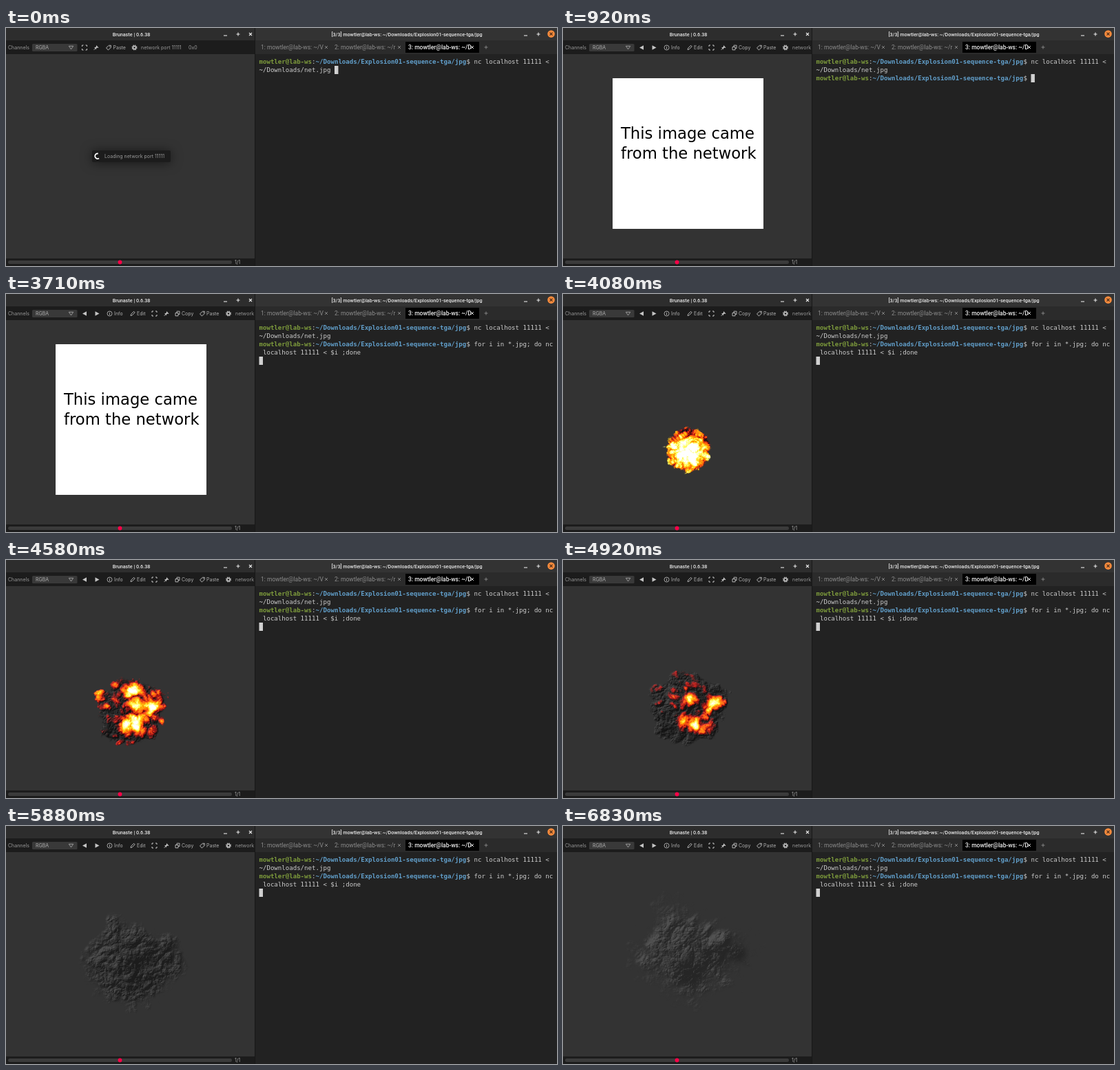
Write an HTML page with a canvas that moves like this. It is 800 by 346 pixels and loops after 6.88 s.

```html
<!DOCTYPE html>
<html lang="en">
<head>
<meta charset="utf-8">
<title>Network image viewer</title>
<style>
html, body { margin: 0; width: 100%; height: 100%; overflow: hidden; background: #222; }
canvas { display: block; }
</style>
</head>
<body>
<canvas id="stage" width="800" height="346"></canvas>
<script>
const LOOP = 6880, IMAGE_AT = 750, BLAST_AT = 3746, BLAST_STEP = 1000 / 24;
const APP = 'Brunaste', USER = 'mowtler@lab-ws', DIR = '~/Downloads/Explosion01-sequence-tga/jpg';
const UI = '7px Inter, sans-serif', TITLE = '500 7.2px Roboto, sans-serif';
const MONO = '9.09px "DejaVu Sans Mono", monospace';
const ctx = document.getElementById('stage').getContext('2d');
const clamp = v => v < 0 ? 0 : v > 1 ? 1 : v;
const mix = (a, b, k) => a + (b - a) * k;
const smooth = k => k * k * (3 - 2 * k);

// ---- drawing helpers ----
function rect(x, y, w, h, color, radius = 0) {
  ctx.fillStyle = color;
  ctx.beginPath();
  ctx.roundRect(x, y, w, h, radius);
  ctx.fill();
}
function text(s, x, y, font, color, align = 'left') {
  ctx.font = font;
  ctx.fillStyle = color;
  ctx.textAlign = align;
  ctx.fillText(s, x, y);
}
function stroke(d, x, y, color = '#c4c4c4', width = 1) {
  ctx.save();
  ctx.translate(x, y);
  ctx.strokeStyle = color;
  ctx.lineWidth = width;
  ctx.stroke(new Path2D(d));
  ctx.restore();
}
function fill(d, x, y, color = '#c4c4c4') {
  ctx.save();
  ctx.translate(x, y);
  ctx.fillStyle = color;
  ctx.fill(new Path2D(d));
  ctx.restore();
}
function disc(x, y, r, color) {
  ctx.fillStyle = color;
  ctx.beginPath();
  ctx.arc(x, y, r, 0, 7);
  ctx.fill();
}
const PLUS = 'M-2.5 0H2.5M0-2.5V2.5', CROSS = 'M-2-2L2 2M2-2L-2 2', MINUS = 'M-2.5 2H2.5';

// ---- toolbar icons ----
const icon = {
  expand: x => stroke('M-3.5-1.5V-3.5H-1.5M1.5-3.5H3.5V-1.5M3.5 1.5V3.5H1.5M-1.5 3.5H-3.5V1.5', x, 28.5),
  pin: x => {
    fill('M0-3.5L3.5 0L2.5 .6L1.2 0L-.2 1.6V3L-3-.2L-1.5-.2L0-1.5Z', x, 28.5);
    stroke('M-1.5 1.5L-3.5 3.5', x, 28.5, '#c4c4c4', .8);
  },
  tag: x => {
    stroke('M-3.5 .5L.5-3H3.3V.2L-.7 3.7Z', x, 28.3, '#c4c4c4', .9);
    disc(x + 1.6, 26.9, .6, '#c4c4c4');
  },
  gear: x => {
    ctx.setLineDash([1.4, 1.2]);
    stroke('M3.3 0A3.3 3.3 0 1 1-3.3 0A3.3 3.3 0 1 1 3.3 0', x, 28.5, '#c4c4c4', 1.4);
    ctx.setLineDash([]);
    stroke('M2.1 0A2.1 2.1 0 1 1-2.1 0A2.1 2.1 0 1 1 2.1 0', x, 28.5, '#c4c4c4', 1.5);
  },
  info: x => {
    stroke('M3.5 0A3.5 3.5 0 1 1-3.5 0A3.5 3.5 0 1 1 3.5 0', x, 28.5, '#c4c4c4', .8);
    stroke('M0-.6V2M0-2V-1.2', x, 28.5, '#c4c4c4', .9);
  },
  pencil: x => stroke('M-3 3L-2.4 .8L1.6-3.2L3.2-1.6L-.8 2.4Z', x, 28.5, '#c4c4c4', .9),
  copy: x => stroke('M-3-1H1V3.3H-3ZM-1-1V-3.3H3V1H1', x, 28.5, '#c4c4c4', .9),
  back: x => fill('M-3 0L3-3.2V3.2Z', x, 28.5),
  next: x => fill('M3 0L-3-3.2V3.2Z', x, 28.5)
};
const label = (s, x, color = '#b0b0b0') => text(s, x, 31, UI, color);

function drawToolbar(loaded) {
  rect(0, 18, 361, 20, '#1c1c1c');
  label('Channels', 3, '#999');
  rect(38, 23, 65.5, 11, '#393939', 1.5);
  label('RGBA', 43);
  stroke('M-3.2-2.2H3.2L0 2.4Z', 94.5, 28.5, '#b0b0b0', .8);
  if (!loaded) {
    icon.expand(114); icon.pin(131);
    icon.tag(149); label('Paste', 155.5);
    icon.gear(186.5);
    label('network port 11111', 196, '#999');
    label('0x0', 265, '#999');
    return;
  }
  icon.back(114); icon.next(132.5);
  icon.info(150.5); label('Info', 157);
  icon.pencil(184); label('Edit', 190);
  icon.expand(215.5); icon.pin(233);
  icon.copy(249); label('Copy', 255);
  icon.tag(285); label('Paste', 291);
  icon.gear(323);
  label('network', 333, '#999');
}

function drawViewer(t) {
  const loaded = t >= IMAGE_AT;
  ctx.save();
  ctx.beginPath();
  ctx.rect(0, 0, 361, 346);
  ctx.clip();
  rect(0, 0, 361, 346, '#333');
  rect(0, 0, 361, 18, '#2d2d2d');
  text(APP + ' | 0.6.38', 182, 11.6, TITLE, '#e8e8e8', 'center');
  stroke(MINUS, 318.5, 9, '#e8e8e8', 1.1);
  stroke(PLUS, 337, 9, '#e8e8e8', 1.1);
  stroke(CROSS, 355, 9, '#e8e8e8', 1.1);
  drawToolbar(loaded);
  rect(0, 335, 361, 11, '#1c1c1c');
  rect(3, 338, 325, 5, '#3b3b3b', 2.5);
  disc(165.5, 340.5, 2.9, '#ff0048');
  text('1/1', 332, 343, UI, '#aaa');
  if (!loaded) drawLoading(t);
  else if (t < BLAST_AT) {
    rect(72, 73, 219, 219, '#fff');
    const font = '22.7px "DejaVu Sans", sans-serif';
    text('This image came', 84, 161, font, '#000');
    text('from the network', 84, 190, font, '#000');
  } else drawBlast(Math.floor((t - BLAST_AT) / BLAST_STEP));
  ctx.restore();
}

function drawLoading(t) {
  ctx.save();
  ctx.shadowColor = 'rgba(0,0,0,.55)';
  ctx.shadowBlur = 16;
  ctx.shadowOffsetY = 1;
  rect(125, 178, 114, 17, '#1c1c1c', 2);
  ctx.restore();
  const start = 1 + t / 1000 * 2 * Math.PI;
  ctx.strokeStyle = '#fff';
  ctx.lineWidth = 1.8;
  ctx.beginPath();
  ctx.arc(133, 186.3, 3.8, start, start + 3.9);
  ctx.stroke();
  text('Loading network port 11111', 143, 189, UI, '#999');
}

// ---- terminal ----
const CELL = 5.473;
const cellText = (s, col, row, color, bold) =>
  text(s, 367.5 + col * CELL, 52.4 + row * 12, (bold ? 'bold ' : '') + MONO, color);

function prompt(row, command = '', wrapped = '') {
  cellText(USER, 0, row, '#7e9c3c', true);
  cellText(':', 14, row, '#ccc');
  cellText(DIR, 15, row, '#62a0cc', true);
  cellText('$ ' + command, 55, row, '#ccc');
  cellText(wrapped, 0, row + 1, '#ccc');
}

function drawTerminal(t) {
  rect(361, 0, 439, 346, '#222');
  rect(361, 0, 1, 346, '#181818');
  rect(362, 0, 438, 18, '#333');
  rect(362, 18, 438, 20, '#2b2b2b');
  text(`[3/3] ${USER}: ${DIR}`, 582, 11.6, TITLE, '#e8e8e8', 'center');
  stroke(MINUS, 754.5, 9, '#e8e8e8', 1.1);
  stroke(PLUS, 773, 9, '#e8e8e8', 1.1);
  disc(791.5, 8.6, 5.3, '#f58a3c');
  stroke(CROSS, 791.5, 8.6, '#3a2415', 1.1);

  rect(580, 20, 107, 16, '#000');
  ['V', 'r', 'D'].forEach((dir, i) => {
    const active = i === 2, color = active ? '#eee' : '#8c8c8c';
    text(`${i + 1}: ${USER}: ~/${dir}`, 370 + i * 107, 31,
      (active ? '500 ' : '') + '8.5px Roboto, sans-serif', color);
    stroke(CROSS, 465 + i * 106, 28, color, .9);
  });
  stroke(PLUS, 697, 28, '#8c8c8c', .9);

  const send = ['nc localhost 11111 <', '~/Downloads/net.jpg'];
  const loop = ['for i in *.jpg; do nc', ' localhost 11111 < $i ;done'];
  let col = 0, row = 2;
  prompt(0, ...send);
  if (t < 400) { col = 20; row = 1; }
  if (t >= 790) {
    if (t < 1920) { prompt(2); col = 57; }
    else if (t < 2290) { prompt(2, ...send); col = 20; row = 3; }
    else if (t < 2830) { prompt(2); col = 57; }
    else {
      prompt(2, ...loop);
      if (t < 3710) { col = 27; row = 3; } else row = 4;
    }
  }
  rect(367.5 + col * CELL, 43 + row * 12, CELL, 12, '#d0d0d0');
}

// ---- explosion: noise-displaced outline, lit from the upper left ----
// radii run clockwise from the right; spots are [x, y, radius, heat], negative = shadow
const KEYS = [
  { t: BLAST_AT, x: 182, y: 230, soft: .15, heat: .9, dark: 14, alpha: 1, ragged: .15,
    radii: Array(16).fill(4), spots: [[182, 230, 10, .4]] },
  { t: 4080, x: 182, y: 227, soft: .09, heat: .68, dark: 14, alpha: 1, ragged: .16,
    radii: [31, 31, 33, 32, 33, 31, 34, 34, 33, 33, 33, 34, 34, 33, 34, 34],
    spots: [[184, 231, 19, .65], [165, 225, 14, .2], [178, 200, 11, -.35], [208, 214, 10, -.35]] },
  { t: 4580, x: 181, y: 220, soft: .09, heat: .2, dark: 16, alpha: 1, ragged: .2,
    radii: [47, 46, 54, 49, 48, 50, 55, 48, 46, 55, 47, 50, 50, 48, 49, 58],
    spots: [[181, 188, 13, .75], [210, 213, 11, .85], [183, 236, 14, .9], [134, 206, 9, .25],
      [226, 198, 10, .25], [178, 214, 9, -.25], [148, 250, 18, -.15]] },
  { t: 5330, x: 181, y: 208, soft: .13, heat: -.42, dark: 22, alpha: 1, ragged: .22,
    radii: [72, 60, 64, 58, 60, 62, 68, 65, 72, 64, 55, 66, 58, 57, 59, 75],
    spots: [[162, 155, 13, .85], [181, 165, 9, .85], [219, 205, 12, 1.25], [172, 227, 15, .7],
      [197, 241, 14, .65], [210, 222, 7, .7], [190, 190, 24, -.3]] },
  { t: 6870, x: 185, y: 185, soft: .55, heat: -2.2, dark: 36, alpha: .85, ragged: .4,
    radii: [99, 80, 69, 76, 80, 76, 74, 84, 98, 78, 82, 99, 74, 57, 62, 94],
    spots: [[258, 182, 24, -.7], [182, 214, 20, -.65], [215, 185, 20, -.4]] }
];
const W = 210, H = 196, LEFT = 84, TOP = 82;
const cloud = new OffscreenCanvas(W, H), cloudCtx = cloud.getContext('2d');
const pixels = cloudCtx.createImageData(W, H);
const relief = new Float32Array(W * H), bump = new Float32Array(W * H), depth = new Float32Array(W * H);

let seed = 11;
const random = () => (seed = seed * 16807 % 2147483647) / 2147483647;
const perm = Uint8Array.from({ length: 256 }, () => random() * 256);
const grads = Float32Array.from({ length: 768 }, () => random() * 2 - 1);
function corner(i, j, k, x, y, z) {
  const g = 3 * perm[(perm[(perm[i & 255] + j) & 255] + k) & 255];
  return grads[g] * x + grads[g + 1] * y + grads[g + 2] * z;
}
function noise(x, y, z) {
  const i = Math.floor(x), j = Math.floor(y), k = Math.floor(z);
  x -= i; y -= j; z -= k;
  const u = smooth(x), v = smooth(y);
  const layer = (n, w) => mix(
    mix(corner(i, j, n, x, y, w), corner(i + 1, j, n, x - 1, y, w), u),
    mix(corner(i, j + 1, n, x, y - 1, w), corner(i + 1, j + 1, n, x - 1, y - 1, w), u), v);
  return mix(layer(k, z), layer(k + 1, z - 1), smooth(z));
}
function billow(x, y, z) {
  let sum = 0, gain = 1.8;
  for (let o = 0; o < 5; o++) {
    sum += Math.abs(noise(x, y, z)) * gain;
    x = x * 2 + 17.3; y = y * 2 + 9.1; z = z * 1.4 + 3.7;
    gain /= 1.8;
  }
  return sum;
}

let shownStep = -1;
function drawBlast(step) {
  if (step !== shownStep) renderBlast(BLAST_AT + step * BLAST_STEP);
  shownStep = step;
  ctx.drawImage(cloud, LEFT, TOP);
}

function renderBlast(time) {
  let n = 0;
  while (n < KEYS.length - 2 && time >= KEYS[n + 1].t) n++;
  const a = KEYS[n], b = KEYS[n + 1];
  let k = clamp((time - a.t) / (b.t - a.t));
  if (n === 0) k = Math.sqrt(k);
  const at = name => mix(a[name], b[name], k);
  const cx = at('x'), cy = at('y'), soft = at('soft'), heat = at('heat');
  const dark = at('dark'), alpha = at('alpha'), ragged = at('ragged');
  const radii = a.radii.map((r, i) => mix(r, b.radii[i], k));
  const size = radii.reduce((s, r) => s + r) / 16;
  const spots = [[a, 1 - k], [b, k]].flatMap(([key, weight]) =>
    key.spots.map(([x, y, r, power]) => [x, y, r * r, power * weight]));

  for (let p = 0; p < W * H; p++) {
    const dx = p % W + LEFT - cx, dy = Math.floor(p / W) + TOP - cy;
    const turn = (Math.atan2(dy, dx) / (2 * Math.PI) + 1) * 16, i = Math.floor(turn);
    const d = Math.hypot(dx, dy) / mix(radii[i % 16], radii[(i + 1) % 16], smooth(turn - i));
    depth[p] = d;
    if (d > 1.4) { relief[p] = 0; continue; }
    bump[p] = billow(dx / size * 2.7 + 40, dy / size * 2.7 + 40, time / 1100);
    relief[p] = size * (.42 * (1 - d * d) + .34 * bump[p]);
  }

  const out = pixels.data;
  for (let p = 0; p < W * H; p++) {
    const d = depth[p], o = p * 4, rough = bump[p] - .55;
    out[o + 3] = 0;
    if (d > 1.4) continue;
    const edge = clamp((1 - d + rough * ragged) / soft);
    if (!edge) continue;
    const x = p % W + LEFT, y = Math.floor(p / W) + TOP;
    let glow = 0, shadow = 0;
    for (const [sx, sy, rr, power] of spots) {
      const v = power * Math.exp(-((x - sx) ** 2 + (y - sy) ** 2) / rr);
      if (power > 0) glow += v; else shadow += v;
    }
    const slope = p > W ? relief[p] - relief[p - W - 1] : 0;
    const light = clamp(.42 + slope * .13 + rough * .25 + shadow);
    const temp = heat + glow + shadow + rough * .85 - .3 * d ** 4;
    const grey = (dark + light * 52) * (1 - clamp(temp));
    out[o] = Math.max(grey, 255 * clamp(temp * 2.2));
    out[o + 1] = Math.max(grey, 255 * clamp((temp - .25) * 1.6));
    out[o + 2] = Math.max(grey, 255 * clamp((temp - .7) * 2.2));
    out[o + 3] = 255 * alpha * smooth(edge);
  }
  cloudCtx.putImageData(pixels, 0, 0);
}

function draw() {
  const t = performance.now() % LOOP;
  drawViewer(t);
  drawTerminal(t);
  requestAnimationFrame(draw);
}
draw();
</script>
</body>
</html>
```
